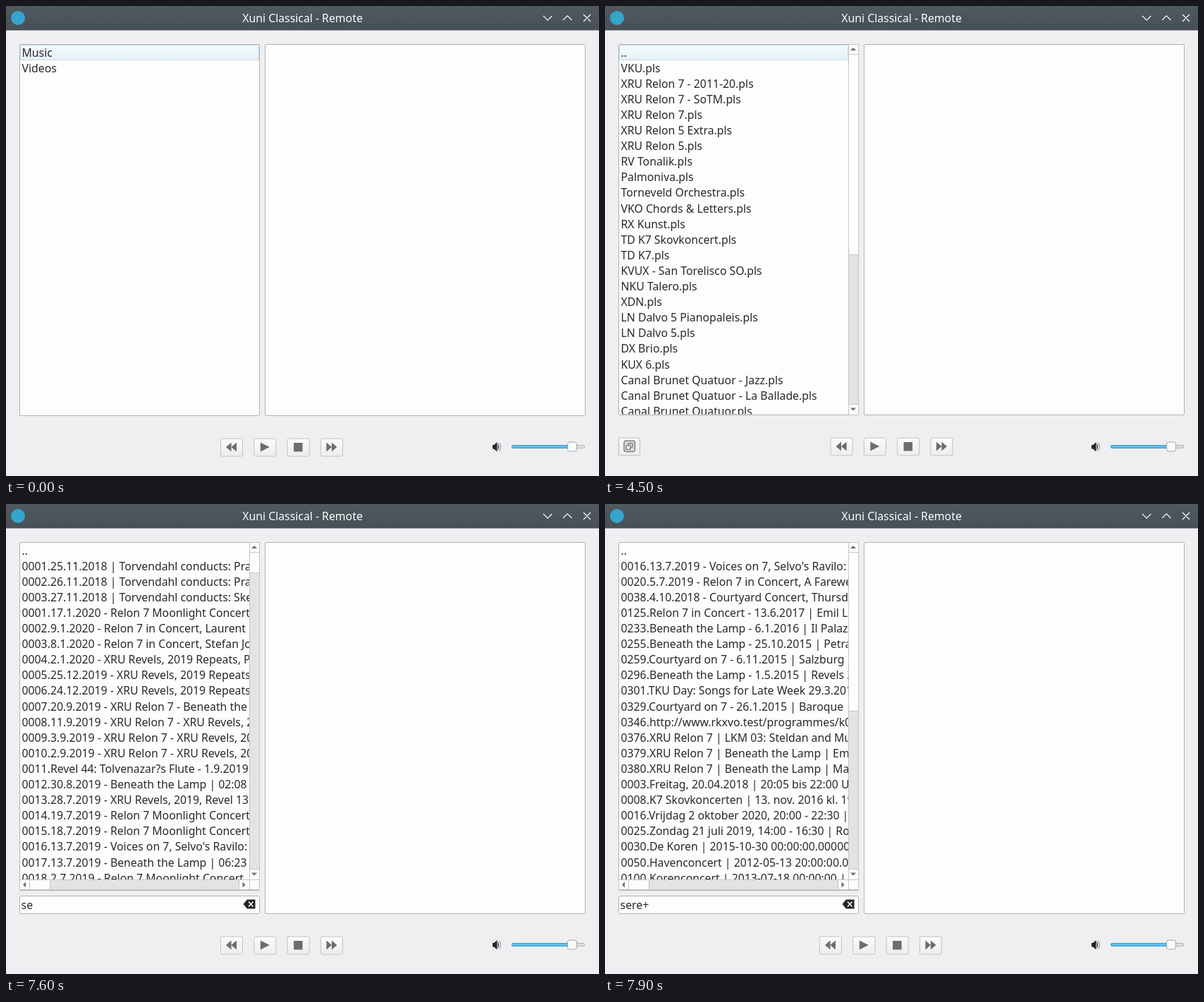
Animation, 841 px wide and 666 px high, one loop 8000 ms. Source, as an HTML page:

```html
<!DOCTYPE html>
<html lang="en">
<head>
<meta charset="utf-8">
<title>Remote</title>
<style>
html, body { margin: 0; width: 100%; height: 100%; overflow: hidden; background: #efeff1; }
svg { display: block; width: 100%; height: 100%; }
text { font: 15.8px "Noto Sans", "Open Sans", sans-serif; fill: #26292c; white-space: pre; }
</style>
</head>
<body>
<svg id="stage" viewBox="0 0 841 666">
  <defs>
    <linearGradient id="bar" x2="0" y2="1"><stop stop-color="#4f5960"/><stop offset="1" stop-color="#475057"/></linearGradient>
    <linearGradient id="hover" x2="0" y2="1"><stop stop-color="#f5fafd"/><stop offset="1" stop-color="#e6f1f7"/></linearGradient>
    <linearGradient id="key" x2="0" y2="1"><stop stop-color="#fbfbfb"/><stop offset="1" stop-color="#ededee"/></linearGradient>
  </defs>
  <rect width="841" height="666" fill="#efeff1"/>
  <rect width="841" height="34.5" fill="url(#bar)"/>
  <circle cx="17" cy="17" r="10" fill="#35a5cc"/>
  <text x="420.5" y="23.2" text-anchor="middle" style="fill:#fcfcfc">Xuni Classical - Remote</text>
  <path d="M762 14l6.200 6.200l6.200-6.200M790 20l6.200-6.200l6.200 6.200M819 12l10 10m0-10l-10 10" fill="none" stroke="#fcfcfc" stroke-width="1.2"/>
  <path d="M690 622h2l4.500-4v13.500l-4.500-4h-2z" fill="#232629"/>
  <path d="M697.500 619.500q3.500 5.200 0 10.500z" fill="#4a4d50"/>
  <path d="M699.500 619q4 5.700 0 11.500" fill="none" stroke="#85878a"/>
  <rect x="717.5" y="622.5" width="103" height="4" rx="1.500" fill="#dcdddd" stroke="#b4b6b7"/>
  <rect x="717.5" y="622.5" width="82" height="4" rx="1.500" fill="#5fc0ee" stroke="#3a9bca"/>
  <rect x="796.5" y="618" width="13" height="13" rx="3" fill="#fafafa" stroke="#a3a5a6"/>
  <g id="view"></g>
</svg>
<script>
const view = document.getElementById('view');
const LOOP = 8000, PITCH = 22.1, GREY = '#b0b2b3';

const live = 'Relon 7 in Concert', noon = 'Relon 7 Moonlight Concert', net = 'XRU Relon 7';
const night = 'Beneath the Lamp', stage = 'Voices on 7', yard = 'Courtyard on 7', gala = 'XRU Revels';

const stations = ['VKU', net + ' - 2011-20', net + ' - SoTM', net, 'XRU Relon 5 Extra', 'XRU Relon 5',
  'RV Tonalik', 'Palmoniva', 'Torneveld Orchestra', 'VKO Chords &amp; Letters', 'RX Kunst',
  'TD K7 Skovkoncert', 'TD K7', 'KVUX - San Torelisco SO', 'NKU Talero', 'XDN',
  'LN Dalvo 5 Pianopaleis', 'LN Dalvo 5', 'DX Brio', 'KUX 6', 'Canal Brunet Quatuor - Jazz',
  'Canal Brunet Quatuor - La Ballade', 'Canal Brunet Quatuor'].map(s => s + '.pls');

const shows = [
  '0001.25.11.2018 | Torvendahl conducts: Pralenko',
  '0002.26.11.2018 | Torvendahl conducts: Pralenko',
  '0003.27.11.2018 | Torvendahl conducts: Skelvin',
  `0001.17.1.2020 - ${noon}s`,
  `0002.9.1.2020 - ${live}, Laurent`,
  `0003.8.1.2020 - ${live}, Stefan Jorvel`,
  `0004.2.1.2020 - ${gala}, 2019 Repeats, Part`,
  `0005.25.12.2019 - ${gala}, 2019 Repeats,`,
  `0006.24.12.2019 - ${gala}, 2019 Repeats,`,
  `0007.20.9.2019 - ${net} - ${night}`,
  `0008.11.9.2019 - ${net} - ${gala}, 2019`,
  `0009.3.9.2019 - ${net} - ${gala}, 2019`,
  `0010.2.9.2019 - ${net} - ${gala}, 2019`,
  '0011.Revel 44: Tolvenazar?s Flute - 1.9.2019',
  `0012.30.8.2019 - ${night} | 02:08`,
  `0013.28.7.2019 - ${gala}, 2019, Revel 13`,
  `0014.19.7.2019 - ${noon}s`,
  `0015.18.7.2019 - ${noon}s`,
  `0016.13.7.2019 - ${stage}, Selvo's Ravilo:`,
  `0017.13.7.2019 - ${night} | 06:23`,
  `0018.2.7.2019 - ${noon}`
];

const farewell = `0020.5.7.2019 - ${live}, A Farewell`;
const misses = [2, 3, 6, 9, 13, 14, 15, 20];
const broad = shows.filter((_, i) => !misses.includes(i)).concat([
  farewell,
  `0021.1.6.2019 - ${stage}, Tilly Rond by Renlo`,
  `0025.27.4.2019 | ${net} - ${stage}, Jolm`,
  `0027.${net} - ${live}, Legends`,
  `0028.${night} - 5.4.2019 | 1:51 am`,
  `0030.${night} - 16.3.2019 | 01:01`,
  `0031.30.1.2019 - ${live}, Watery`,
  `0032.5.2.2019 - ${live}, Varn's Mass`
]);
const narrow = [
  shows[18], farewell,
  '0038.4.10.2018 - Courtyard Concert, Thursday',
  `0125.${live} - 13.6.2017 | Emil Luvane`,
  `0233.${night} - 6.1.2016 | Il Palazzo`,
  `0255.${night} - 25.10.2015 | Petra`,
  `0259.${yard} - 6.11.2015 | Salzburg`,
  `0296.${night} - 1.5.2015 | Revels 2014`,
  '0301.TKU Day: Songs for Late Week 29.3.2015',
  `0329.${yard} - 26.1.2015 | Baroque`,
  '0346.http://www.rkxvo.test/programmes/k04',
  `0376.${net} | LKM 03: Steldan and Mulvo`,
  `0379.${net} | ${night} | Emil`,
  `0380.${net} | ${night} | Marta`,
  '0003.Freitag, 20.04.2018 | 20:05 bis 22:00 Uhr',
  '0008.K7 Skovkoncerten | 13. nov. 2016 kl. 19',
  '0016.Vrijdag 2 oktober 2020, 20:00 - 22:30 |',
  '0025.Zondag 21 juli 2019, 14:00 - 16:30 | Rotte',
  '0030.De Koren | 2015-10-30 00:00:00.00000',
  '0050.Havenconcert | 2012-05-13 20:00:00.000',
  '0100.Korenconcert | 2013-07-18 00:00:00 |'
];

const up = rows => ['..', ...rows];
const filterView = (typed, rows, thumb, extra) =>
  ({ rows: up(rows), typed, thumb, bottom: 547, filter: true, ...extra });

const scenes = [
  { at: 0, rows: ['Music', 'Videos'], hover: true, bottom: 580 },
  { at: 3000, rows: up(['Playlists', 'Stations']), hover: true, bottom: 580 },
  { at: 4500, rows: up(stations), hover: true, bottom: 579, thumb: 352, copy: true },
  { at: 6000, ...filterView('', shows, 97, { hover: true }) },
  { at: 7500, ...filterView('s', shows, 97, { caret: true }) },
  { at: 7600, ...filterView('se', shows, 97, { clear: true }) },
  { at: 7700, ...filterView('ser', broad, 97, { clear: true }) },
  { at: 7800, ...filterView('sere', narrow, 293, { clear: true }) },
  { at: 7900, ...filterView('sere+', narrow, 293, { clear: true }) }
];

// A bordered box between two corners
const box = (x, y, r, b, fill = '#fdfdfd', line = GREY, rx = 0) =>
  `<rect x="${x + .5}" y="${y + .5}" width="${r - x - 1}" height="${b - y - 1}" rx="${rx}" fill="${fill}" stroke="${line}"/>`;
const shape = (d, fill = '#6b6d6f') => `<path d="${d}" fill="${fill}"/>`;
const label = (x, y, s, style = '') => `<text x="${x}" y="${y}" style="${style}">${s}</text>`;

function vertBar(end, thumb) {
  const line = '#c3c5c6';
  return box(345, 54, 360, end, '#e3e3e4', line) + box(345, 54, 360, 69, '#fcfcfc', line) +
    box(345, 68, 360, thumb, '#fdfdfd', line) + box(345, end - 16, 360, end, '#fcfcfc', line) +
    shape('M348 63h8l-4-4z') + shape(`M348 ${end - 10.5}h8l-4 4z`);
}

function horzBar() {
  const line = '#c3c5c6';
  return box(19, 532, 346, 547, '#e3e3e4', line) + box(19, 532, 34, 547, '#fcfcfc', line) +
    box(33, 532, 63, 547, '#fdfdfd', line) + box(330, 532, 346, 547, '#fcfcfc', line) +
    box(345, 532, 360, 547, '#fcfcfc', line) +
    shape('M28 535.500v8l-4-4z') + shape('M335.500 535.500v8l4-4z');
}

function buttons(x0, y) {
  const icons = [
    'M8 12.500l7.500-6.500v13zM15.500 12.500l7.500-6.500v13z',
    'M9.500 6l13 6.500l-13 6.500z',
    'M9.500 6.500h12.500v12.500h-12.500z',
    'M8.500 6l7.500 6.500l-7.500 6.500zM16 6l7.500 6.500l-7.500 6.500z'
  ];
  return icons.map((d, i) => `<g transform="translate(${x0 + i * 47.3} ${y})">` +
    box(0, 0, 32, 26, 'url(#key)', '#c0c2c3', 2) + shape(d) + '</g>').join('');
}

const copyButton = () => box(19, 611.5, 50, 637.5, 'url(#key)', '#b8babb', 2) +
  '<g fill="none" stroke="#808284" stroke-width="1.500">' +
  '<rect x="27" y="616" width="15.500" height="15.500" rx="3" fill="#d9dadb"/>' +
  '<rect x="33" y="619.500" width="6" height="6" rx="1.500"/>' +
  '<rect x="30" y="622.500" width="6" height="6" rx="1.500" fill="#efeff1"/></g>';

function filterBox(s) {
  let out = box(19, 555, 360, 581, '#fdfdfd', GREY, 2);
  out += s.typed ? label(21.6, 573.6, s.typed)
    : label(21.2, 573.6, 'Enter literal text or word+word to filter', 'fill:#87898b');
  if (s.caret) out += '<rect x="30" y="559" width="1" height="19" fill="#232629"/>';
  if (s.clear) out += shape('M336.500 567l5.500-6.500h11.500v13h-11.500z', '#232629') +
    '<path d="M344 563.500l6.500 7m0-7l-6.500 7" stroke="#fcfcfc" stroke-width="1.500"/>';
  return out;
}

function draw(s) {
  const right = s.thumb ? 345 : 359;
  const end = s.filter ? 533 : s.bottom;
  const paneEnd = s.copy ? 580 : 581;
  let out = box(19, 54, 360, s.filter ? 548 : paneEnd, '#fdfdfd', GREY, 1.5) +
    box(367, 54, 822, paneEnd, '#fdfdfd', GREY, 1.5);
  if (s.hover) out += box(20, 55, right, 77, 'url(#hover)', '#c3dce9', 1);
  out += `<clipPath id="pane"><rect x="20" y="55" width="${right - 19.5}" height="${end - 55.5}"/></clipPath>` +
    '<g clip-path="url(#pane)">' +
    s.rows.map((row, i) => label(22.5, (71.5 + PITCH * i).toFixed(1), row)).join('') + '</g>';
  if (s.thumb) out += vertBar(s.filter ? 533 : 580, s.thumb + 1);
  if (s.filter) out += horzBar() + filterBox(s);
  if (s.copy) out += copyButton();
  view.innerHTML = out + buttons(s.copy ? 319.5 : 304, s.copy ? 611.5 : 612.5);
}

let shown;
function update(now) {
  const t = now % LOOP;
  const scene = scenes.findLast(s => s.at <= t);
  if (scene !== shown) draw(shown = scene);
}
function tick() {
  update(performance.now());
  requestAnimationFrame(tick);
}
tick();
</script>
</body>
</html>
```
